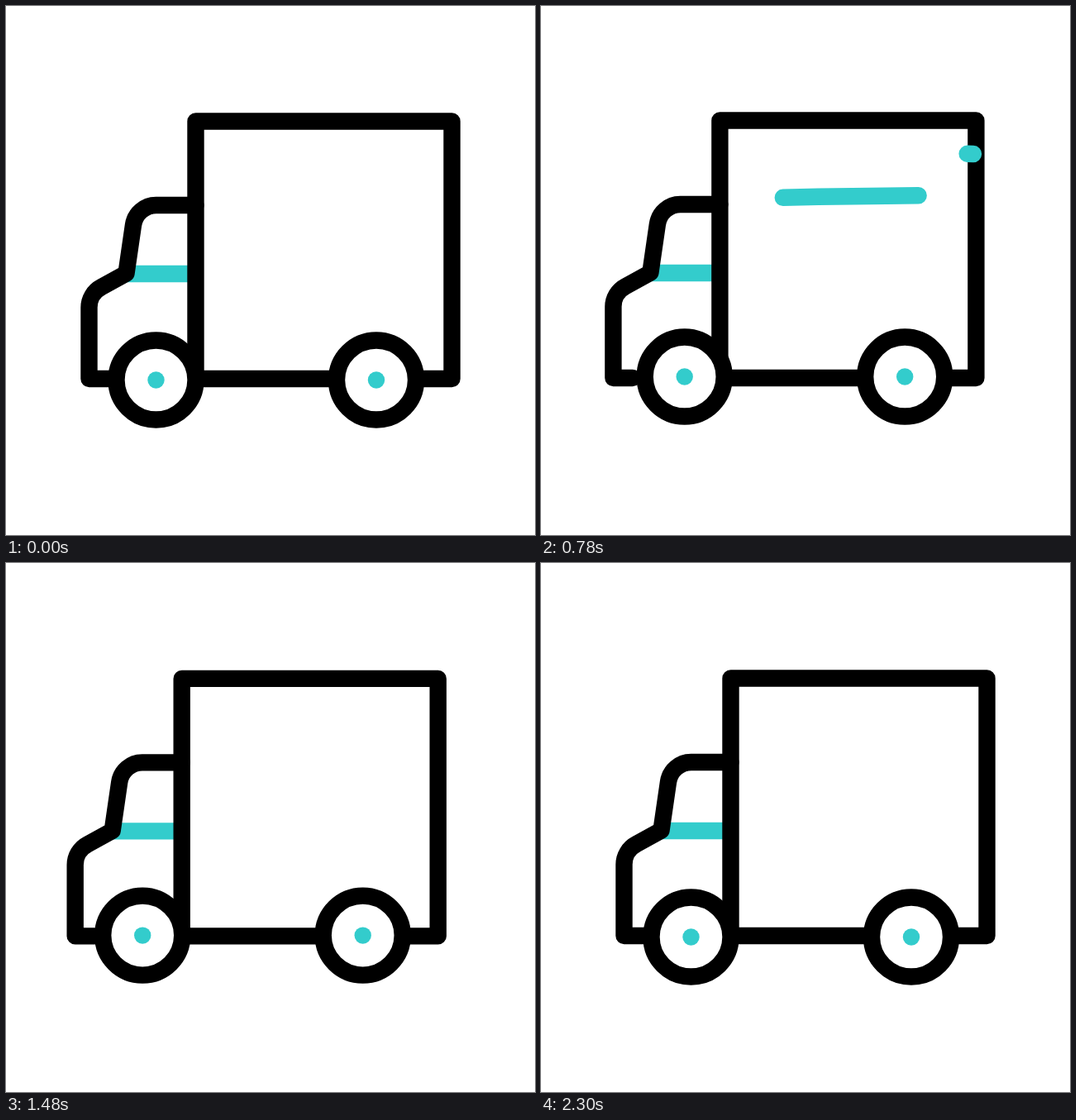
An HTML page that plays this animation: 640x640 px, repeating every 2.66 s.

```html
<!DOCTYPE html>
<html lang="en">
<head>
<meta charset="utf-8">
<title>Delivery truck</title>
<style>
  html, body { margin: 0; width: 100%; height: 100%; overflow: hidden; background: #fff; }
  svg { display: block; width: 100%; height: 100%; }
  path, circle { fill: none; stroke: #000; stroke-width: 20.4; stroke-linecap: round; stroke-linejoin: round; }
  .teal { stroke: #33cccc; }
  .tyre { fill: #fff; }
  .hub { fill: #33cccc; stroke: none; }
</style>
</head>
<body>
<svg viewBox="0 0 640 640">
  <g id="body">
    <path class="teal" style="stroke-linecap:butt" d="M146 324H229"/>
    <path d="M229.5 241H182A28 28 0 0 0 154 265L145.5 323.5L115.5 340A28 28 0 0 0 100.5 365V451H124"/>
    <path d="M229.5 139.5H539.5V451H229.5Z"/>
  </g>
  <g id="wheels">
    <circle class="tyre" cx="181.5" cy="452.5" r="48"/>
    <circle class="hub" cx="181.5" cy="452.5" r="10.2"/>
    <circle class="tyre" cx="448" cy="452.5" r="48"/>
    <circle class="hub" cx="448" cy="452.5" r="10.2"/>
  </g>
  <g id="streaks"></g>
</svg>
<script>
const LOOP = 2660, STEP = 20;
const $ = id => document.getElementById(id);
const clamp = v => Math.min(1, Math.max(0, v));
const ease = v => { v = clamp(v); return v * v * (3 - 2 * v); };

// Eased value through [time, value] keys.
function track(keys, t) {
  let value = keys[0][1];
  for (let i = 1; i < keys.length; i++) {
    const [t0, a] = keys[i - 1], [t1, b] = keys[i];
    value += (b - a) * ease((t - t0) / (t1 - t0));
  }
  return value;
}

const parts = [
  { el: $('body'),
    x: [[15, 0], [555, -21], [1095, 0], [1635, -21], [2175, 0]],
    y: [[20, 0], [600, -4], [1150, 8.2], [1705, -4], [2200, 0]] },
  { el: $('wheels'),
    x: [[15, 0], [505, -22], [1100, 10], [1620, -22], [2225, 0]],
    y: [[20, 0], [600, -8], [1150, 8.2], [1715, -8], [2240, 0]] }
];

// Path, start time, travel time, delay of the tail behind the head.
const streaks = [
  ['M130 509.5Q330 503 525 510', 90, 320, 118],
  ['M130 509.5Q330 503 525 510', 1036, 320, 118],
  ['M340 177Q430 176.5 523 179', 95, 574, 180],
  ['M240 233Q400 229 530 229', 525, 380, 152],
  ['M330 309Q520 308.5 618 311', 1600, 400, 128],
  ['M300 365.5Q440 362 576 361', 1646, 480, 154],
  ['M82 315Q58 290 33 250', 1817, 380, 99],
  ['M80 355L31 350.6', 1660, 400, 205],
  ['M74 394L33 420', 1748, 380, 139]
].map(([d, start, time, lag]) => {
  const el = document.createElementNS('http://www.w3.org/2000/svg', 'path');
  el.setAttribute('class', 'teal');
  el.setAttribute('d', d);
  el.setAttribute('pathLength', 1);
  $('streaks').append(el);
  return { el, start, time, lag };
});

function draw(t) {
  for (const { el, x, y } of parts)
    el.setAttribute('transform', `translate(${track(x, t)} ${track(y, t)})`);
  for (const { el, start, time, lag } of streaks) {
    const head = ease((t - start) / time);
    const tail = ease((t - start - lag) / time);
    const length = head - tail;
    el.style.display = length > 0.0005 ? '' : 'none';
    el.style.strokeDasharray = `${length} 9`;
    el.style.strokeDashoffset = -tail;
  }
}

function frame() {
  draw(Math.floor(performance.now() % LOOP / STEP) * STEP);
  requestAnimationFrame(frame);
}
frame();
</script>
</body>
</html>
```
